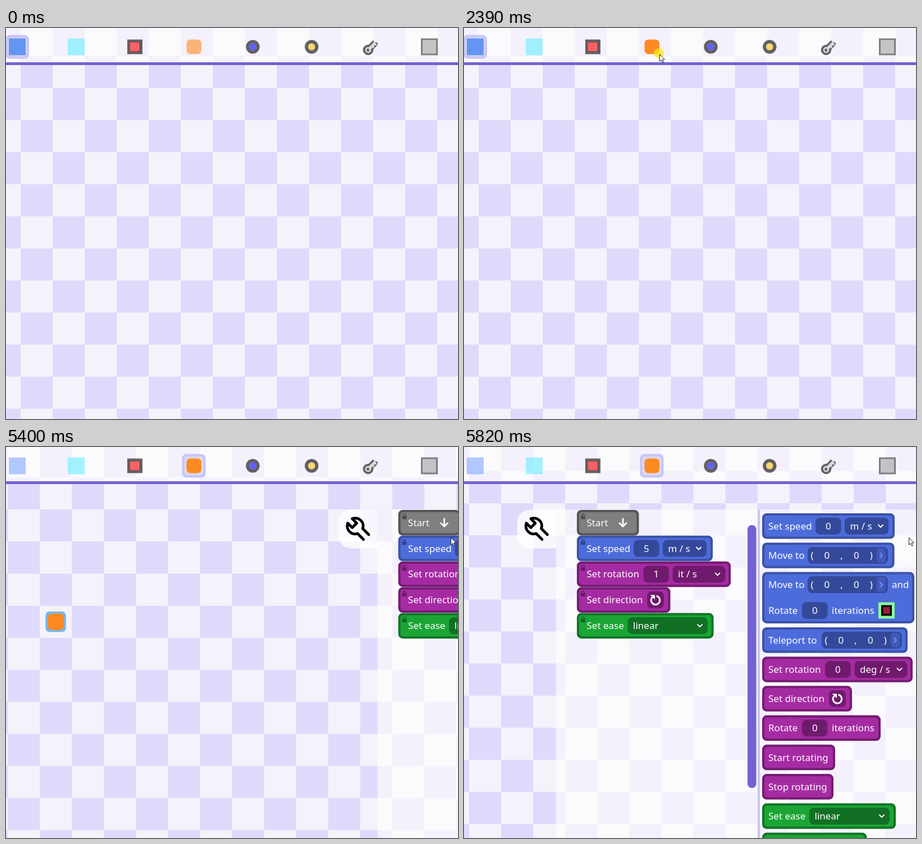
An HTML page with a canvas that plays this animation: 805x696 px, repeating every 8.15 s.

```html
<!DOCTYPE html>
<html lang="en">
<head>
<meta charset="utf-8">
<title>Level editor</title>
<style>
html, body { margin: 0; width: 100%; height: 100%; overflow: hidden; background: #f4f3fb; }
canvas { display: block; }
</style>
</head>
<body>
<canvas id="stage" width="805" height="696"></canvas>
<script>
const W = 805, H = 696, LOOP = 8150, STEP = 70, CELL = 57.08;
const ctx = document.getElementById('stage').getContext('2d');
const BLUE = { fill: '#4d6cdb', edge: '#3a52a6', field: '#34499a' };
const PURPLE = { fill: '#a52ba2', edge: '#741b72', field: '#701a6e' };
const GREEN = { fill: '#1aa535', edge: '#127426', field: '#117024' };
const GREY = { fill: '#7f7f7f', edge: '#555', field: '#555' };
const ORANGE = '#fc8a22', ACCENT = '#7262d3';

// time, x, y of the pointer
const POINTER = [
  [920, 8, 363], [990, 26, 355], [1060, 92, 350], [1130, 136, 344], [1200, 163, 339],
  [1270, 165, 310], [1340, 178, 257], [1410, 208, 207], [1480, 228, 162], [1550, 229, 143],
  [1690, 229, 129], [1760, 245, 129], [1900, 286, 127], [2040, 318, 105], [2110, 338, 78],
  [2180, 350, 52], [2250, 348, 45], [2600, 348, 48], [2670, 346, 75], [2740, 340, 115],
  [2880, 322, 186], [3020, 300, 235], [3160, 285, 260], [3230, 284, 263], [3770, 284, 263],
  [3840, 292, 274], [3980, 337, 301], [4120, 460, 310], [4190, 560, 304], [4260, 668, 284],
  [4330, 735, 238], [4400, 768, 180], [4460, 784, 138], [4530, 789, 145], [4600, 792, 160], [4670, 792, 161]
];

const clamp = v => Math.max(0, Math.min(1, v));

function along(keys, t) {
  let i = 1;
  while (i < keys.length - 1 && keys[i][0] < t) i++;
  const a = keys[i - 1], b = keys[i], u = clamp((t - a[0]) / (b[0] - a[0]));
  return [a[1] + (b[1] - a[1]) * u, a[2] + (b[2] - a[2]) * u];
}

// cubic-bezier(.25, .1, .25, 1)
function ease(x) {
  x = clamp(x);
  let lo = 0, hi = 1;
  const curve = (s, p, q) => 3 * s * (1 - s) ** 2 * p + 3 * s * s * (1 - s) * q + s ** 3;
  for (let i = 0; i < 20; i++) {
    const mid = (lo + hi) / 2;
    if (curve(mid, .25, .25) < x) lo = mid; else hi = mid;
  }
  return curve(lo, .1, 1);
}

function held(t) {
  const start = [5330, 3840, 3290, 920].find(s => s <= t);
  return start === undefined ? t : start + Math.floor((t - start) / STEP) * STEP;
}

function box(x, y, w, h, color, r = 0) {
  ctx.fillStyle = color;
  ctx.beginPath();
  ctx.roundRect(x, y, w, h, r);
  ctx.fill();
}

function disc(x, y, r, color) {
  ctx.fillStyle = color;
  ctx.beginPath();
  ctx.arc(x, y, r, 0, 7);
  ctx.fill();
}

function frameRect(x, y, w, h, line, color, r = 0) {
  ctx.strokeStyle = color;
  ctx.lineWidth = line;
  ctx.beginPath();
  ctx.roundRect(x + line / 2, y + line / 2, w - line, h - line, r);
  ctx.stroke();
}

function trace(points, color, width, cap = 'round') {
  ctx.strokeStyle = color;
  ctx.lineWidth = width;
  ctx.lineCap = ctx.lineJoin = cap;
  ctx.beginPath();
  points.forEach(p => ctx.lineTo(p[0], p[1]));
  ctx.stroke();
}

function polygon(points, color) {
  ctx.fillStyle = color;
  ctx.beginPath();
  points.forEach(p => ctx.lineTo(p[0], p[1]));
  ctx.closePath();
  ctx.fill();
}

function at(x, y, draw) {
  ctx.save();
  ctx.translate(x, y);
  draw();
  ctx.restore();
}

function board(dx, dy) {
  ctx.fillStyle = '#f4f3fb';
  ctx.fillRect(0, 0, W, H);
  ctx.fillStyle = '#dfd9fb';
  for (let c = -1; c < 21; c++) for (let r = -5; r < 11; r++) {
    if ((c + r) & 1) {
      const x = 26 + dx + c * CELL, y = 107 + dy + r * CELL;
      ctx.fillRect(x, y, CELL, CELL);
    }
  }
}

function selection(x) {
  box(x, 12.5, 42, 42, '#c6c4fa', 8);
  box(x + 4, 16.5, 34, 34, '#d9d8ec', 5);
}

function keyIcon() {
  at(645, 39, () => {
    ctx.rotate(-Math.PI / 4);
    for (const [grow, color] of [[4, '#666368'], [0, '#dcdce0']]) {
      disc(0, 0, 5.3 + grow, color);
      trace([[4, 0], [18, 0]], color, 5 + grow * 1.7, 'butt');
      trace([[10, 0], [10, 5]], color, 2.5 + grow * 1.4, 'butt');
      trace([[16, 0], [16, 5]], color, 2.5 + grow * 1.4, 'butt');
    }
    disc(-.5, 0, 2.6, '#666368');
  });
}

function toolbar(orangeTool, orangeHover) {
  box(0, 0, W, 61, 'rgba(255,255,255,.65)');
  selection(orangeTool ? 313.5 : -1);
  box(5, 18.5, 30, 30, orangeTool ? 'rgba(104,152,255,.5)' : '#6495f2');
  ctx.globalAlpha = .6;
  box(110, 18.5, 30, 30, '#6aeeff');
  box(221, 25, 18, 17, '#f00');
  frameRect(216, 20.5, 27, 26, 5, '#000');
  for (const [x, color] of [[439.5, '#00f'], [544.3, '#ffc80a']]) {
    disc(x, 33.5, 6.2, color);
    ctx.strokeStyle = '#000';
    ctx.lineWidth = 6;
    ctx.beginPath();
    ctx.arc(x, 33.5, 9.2, 0, 7);
    ctx.stroke();
  }
  box(742, 21.5, 24, 24, '#a2a2a2');
  frameRect(739, 18.5, 30, 30, 3, '#2c2c2c');
  ctx.globalAlpha = orangeHover ? 1 : .6;
  box(321.5, 20.5, 26.5, 26, ORANGE, 7);
  ctx.globalAlpha = 1;
  keyIcon();
  box(0, 61, W, 5, ACCENT);
}

function text(s, x, y, align = 'left') {
  ctx.fillStyle = '#fff';
  ctx.font = '17px "Noto Sans", "Open Sans", sans-serif';
  ctx.textAlign = align;
  ctx.textBaseline = 'alphabetic';
  ctx.fillText(s, x, y + 6);
}

function block(x, y, w, c, label, h = 45.5) {
  box(x, y, w, h, c.edge, 8);
  box(x + 4, y + 4, w - 8, h - 8, c.fill, 5);
  text(label, x + (x < 400 ? 17.5 : 11), y + 22.7);
}

function value(x, y, c, s) {
  box(x, y - 15, 45.5, 30, c.field, 8);
  text(s, x + 22.8, y, 'center');
}

function choice(x, y, w, c, s) {
  box(x, y - 15, w, 30, c.field, 8);
  text(s, x + 9.5, y);
  trace([[x + w - 18, y - 2], [x + w - 14, y + 2], [x + w - 10, y - 2]], '#fff', 2);
}

function point(x, y) {
  box(x, y - 15, 143, 30, BLUE.field, 8);
  ['(', '0', ',', '0', ')'].forEach((s, i) => text(s, x + 8 + i * 26.3, y, 'center'));
  box(x + 123, y - 13, 16, 26, '#405abb', 6);
  trace([[x + 129, y - 4], [x + 133, y], [x + 129, y + 4]], '#7994ee', 2);
}

function turn(x, y) {
  box(x - 15, y - 15, 30, 30, PURPLE.field, 8);
  at(x, y, () => {
    ctx.strokeStyle = '#fff';
    ctx.lineWidth = 3;
    ctx.beginPath();
    ctx.arc(0, .5, 7.8, -1.2, 3.75);
    ctx.stroke();
    polygon([[-9.5, -8.8], [-1, -8.8], [-1, -.8]], '#fff');
  });
}

function lock(x, y) {
  box(x - 4, y - 1, 8, 6, 'rgba(0,0,0,.38)', 1);
  ctx.strokeStyle = 'rgba(0,0,0,.38)';
  ctx.lineWidth = 1.5;
  ctx.beginPath();
  ctx.arc(x, y - 2, 2.4, Math.PI, 0);
  ctx.stroke();
}

function script() {
  const top = i => 112 + i * 45.85, mid = i => top(i) + 22.7;
  block(201, top(0), 110.5, GREY, 'Start');
  trace([[283, 128], [283, 141]], '#fff', 2.8);
  trace([[277, 135.5], [283, 141.5], [289, 135.5]], '#fff', 2.8);
  block(201, top(1), 242, BLUE, 'Set speed');
  value(302, mid(1), BLUE, '5');
  choice(354, mid(1), 78, BLUE, 'm / s');
  block(201, top(2), 274, PURPLE, 'Set rotation');
  value(319.5, mid(2), PURPLE, '1');
  choice(371.5, mid(2), 94, PURPLE, 'it / s');
  block(201, top(3), 166.5, PURPLE, 'Set direction');
  turn(341, mid(3));
  block(201, top(4), 243.5, GREEN, 'Set ease');
  choice(291.5, mid(4), 142.5, GREEN, 'linear');
  for (let i = 0; i < 5; i++) lock(212, top(i) + 11.5);
}

function palette() {
  const x = 531, row = i => 118 + i * 52.2, mid = i => row(i) + 22.7;
  box(505, 139, 15.5, 468, ACCENT, 7.5);
  box(523, 112, 4, H - 112, '#c8c3ef');
  block(x, row(0), 236, BLUE, 'Set speed');
  value(626, mid(0), BLUE, '0');
  choice(678, mid(0), 78, BLUE, 'm / s');
  block(x, row(1), 235.5, BLUE, 'Move to');
  point(612, mid(1));
  block(x, row(2), 271, BLUE, 'Move to', 91.5);
  point(612, mid(2));
  text('and', 762, mid(2));
  text('Rotate', 542, 291);
  value(602, 291, BLUE, '0');
  text('iterations', 655, 291);
  box(738, 276.5, 29, 29, '#8cf79e');
  box(743, 281.5, 19, 19, '#0a0a0a');
  box(746.5, 285, 12, 12, '#9d1f32');
  block(x, 321, 259, BLUE, 'Teleport to');
  point(637, 343.7);
  block(x, row(5) - 5.8, 268, PURPLE, 'Set rotation');
  value(643, mid(5) - 5.8, PURPLE, '0');
  choice(695.5, mid(5) - 5.8, 94, PURPLE, 'deg / s');
  const lower = i => 425.3 + i * 52.25;
  block(x, lower(0), 160, PURPLE, 'Set direction');
  turn(665, lower(0) + 22.7);
  block(x, lower(1), 211, PURPLE, 'Rotate');
  value(602, lower(1) + 22.7, PURPLE, '0');
  text('iterations', 655, lower(1) + 22.7);
  block(x, lower(2), 130, PURPLE, 'Start rotating');
  block(x, lower(3), 127, PURPLE, 'Stop rotating');
  block(x, lower(4), 238, GREEN, 'Set ease');
  choice(615, lower(4) + 22.7, 143, GREEN, 'linear');
  block(x, lower(5), 186.5, GREEN, '');
}

function wrench() {
  ctx.strokeStyle = '#000';
  ctx.lineWidth = 4.8;
  ctx.lineCap = ctx.lineJoin = 'round';
  ctx.beginPath();
  ctx.moveTo(44, 53);
  ctx.lineTo(33.5, 42.5);
  ctx.bezierCurveTo(24, 46, 12, 37, 16, 24);
  ctx.lineTo(24, 32);
  ctx.lineTo(32, 24);
  ctx.lineTo(24, 16);
  ctx.bezierCurveTo(37, 12, 47, 24, 42.5, 33.5);
  ctx.lineTo(53.5, 44.5);
  ctx.stroke();
}

function panel(left, hover) {
  if (left >= W) return;
  box(left, 111.5, 69, 69, hover ? 'rgba(241,240,245,.85)' : 'rgba(255,255,255,.8)', [22, 0, 0, 22]);
  at(left, 111.5, wrench);
  box(left + 69, 111.5, W, H, 'rgba(255,255,255,.65)');
  if (left < 730) at(left - 95, 0, () => { script(); palette(); });
}

function pointer(x, y) {
  const shape = [[.5, .5], [.5, 13.3], [3.4, 10.6], [5.4, 15.2], [7.4, 14.3], [5.4, 9.9], [9.4, 9.6]];
  at(x, y, () => {
    polygon(shape, '#fff');
    trace([...shape, shape[0]], '#222', 1);
  });
}

function draw(time) {
  const t = held(time);
  const [px, py] = along(POINTER, t);
  const orangeTool = t >= 2460, placed = t >= 3500;
  const pan = clamp((t - 5314) / 506);
  const dx = -359.5 * (1 - (1 - pan) ** 4.17);
  const dy = 107.2 * (1 - (1 - pan) ** 4.56);

  board(dx, dy);
  if (t >= 920 && t < 2180) box(px - 31.5, py - 20, 57.2, 57.2, 'rgba(107,156,250,.6)');
  if (t >= 2670 && !placed) box(px - 16, py - 28, 29.5, 29, 'rgba(252,138,34,.22)', 7);
  if (placed) {
    box(264.5 + dx, 231.5 + dy, 36.5, 36.5, '#72b6f8', 7);
    box(268 + dx, 235 + dy, 29.5, 29.5, ORANGE, 8);
  }
  toolbar(orangeTool, t >= 2180);
  panel(W - 68 * ease((t - 2460) / 520) - 642 * ease((t - 5314) / 510), t >= 4400 && t < 5330);
  if ((t >= 2320 && t < 2530) || (t >= 3430 && t < 3570)) disc(px - 1, py - 1, 9, 'rgba(255,232,10,.7)');
  if (t >= 920) pointer(px, py);
}

function tick() {
  draw(performance.now() % LOOP);
  requestAnimationFrame(tick);
}
tick();
</script>
</body>
</html>
```
